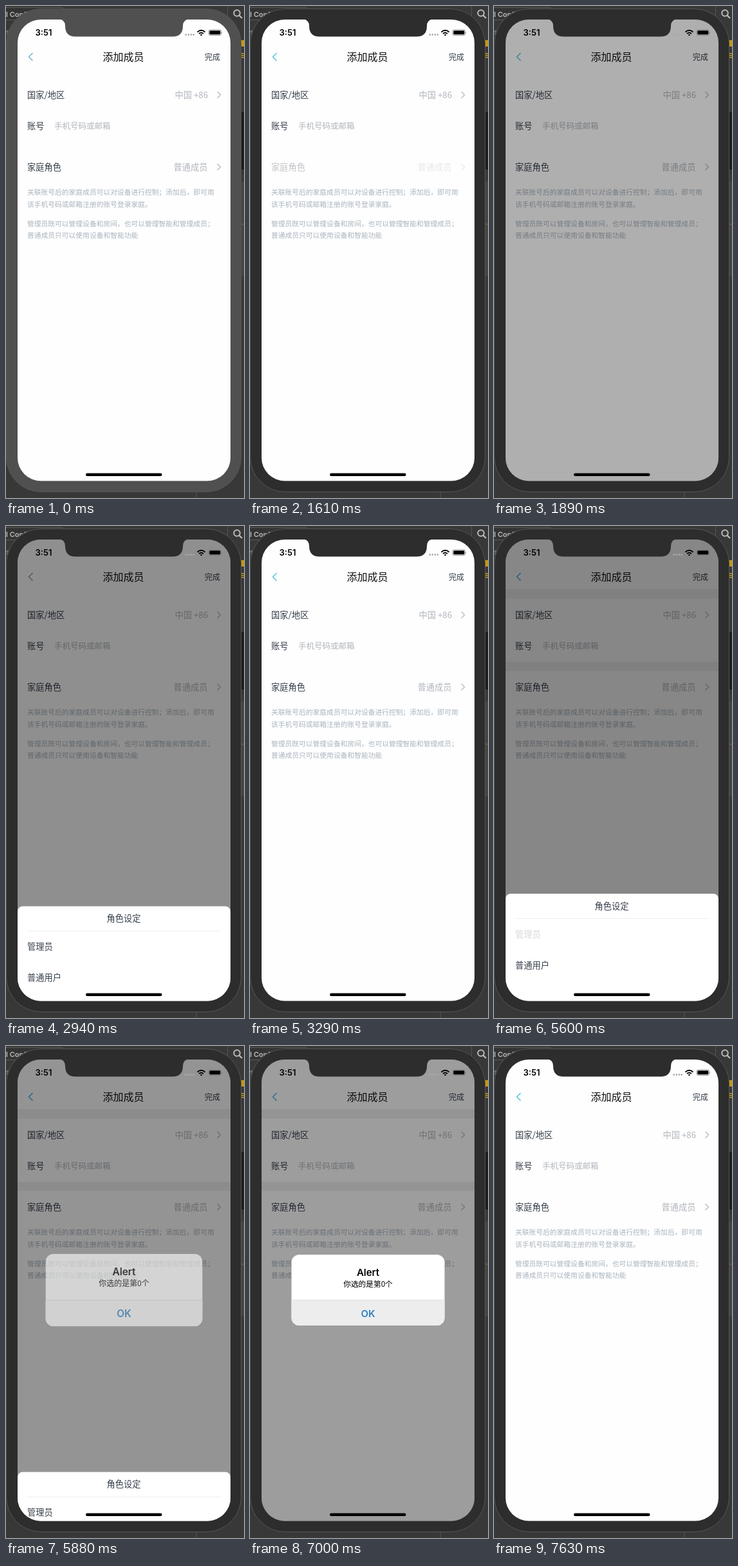
Write an HTML page that moves like this. It is 370 px wide and 764 px high and loops after 8.4 s.

```html
<!DOCTYPE html>
<html lang="zh-CN">
<head>
<meta charset="utf-8">
<style>
  html, body { margin: 0; width: 100%; height: 100%; overflow: hidden; background: #383838; }
  svg { display: block; }
  text { font: 13.24px "Noto Sans CJK SC", "Noto Sans CJK", sans-serif; fill: #343d49; }
  .latin { font-family: Inter, "Liberation Sans", sans-serif; font-weight: 600; }
  .mid { text-anchor: middle; }
  .end { text-anchor: end; }
  .pale, .pale text { fill: #b1b6bc; }
  .note text { font-size: 10.78px; fill: #a9b4be; }
  .line { fill: none; stroke-width: 1.4; }
</style>
</head>
<body>
<svg width="370" height="764" viewBox="0 0 370 764">
  <defs>
    <clipPath id="screen"><rect x="18" y="21" width="331" height="716.5" rx="36"/></clipPath>
    <clipPath id="card"><rect x="64.5" y="324" width="238" height="110" rx="12"/></clipPath>
  </defs>

  <!-- desktop behind the phone -->
  <rect width="370" height="764" fill="#383838"/>
  <rect x="-4" y="2.5" width="94" height="19" rx="3" fill="#343434" stroke="#5b5b5b"/>
  <text x="0" y="17" style="font-size:11px;fill:#bbb" class="latin" font-weight="400">l Config</text>
  <text x="0" y="44" style="font-size:10px;fill:#aaa">s</text>
  <path d="M344.5 0V22M296 754V764M0 48.5H6M362 316.5H370" stroke="#555" fill="none"/>
  <circle cx="359" cy="11" r="4.8" fill="none" stroke="#bbb" stroke-width="2"/>
  <path d="M362.5 14.5L367 19" stroke="#bbb" stroke-width="2.2"/>
  <path d="M363 53H370V63H363ZM364 73H370V74.5H364ZM364 76H370V77.5H364ZM364 79H370V80.5H364ZM364 338H370V339.5H364Z" fill="#c19a12"/>
  <path d="M364 165H370V254H364Z" fill="#1d1d1d"/>
  <path d="M364 272H370V420H364Z" fill="#4a4a4a" opacity=".7"/>

  <rect id="bezel" x=".5" y="4.5" width="365" height="750" rx="54" stroke="#555"/>

  <g clip-path="url(#screen)">
    <rect x="18" y="21" width="331" height="717" fill="#fefefe"/>
    <g id="gaps" fill="#000" opacity=".055">
      <path d="M18 98H349V113H18ZM18 211H349V225H18Z"/>
    </g>
    <path id="back" class="line" d="M41.5 73L35.5 79L41.5 85"/>
    <text x="182.5" y="85" class="mid" style="font-size:16px;fill:#111">添加成员</text>
    <text x="333" y="83.500" class="end" style="font-size:12.2px">完成</text>

    <text x="33" y="143">国家/地区</text>
    <text x="314" y="143" class="end pale">中国 +86</text>
    <path class="line" d="M328.500 133L333.500 138L328.500 143" stroke="#b9bec4"/>
    <text x="33" y="191">账号</text>
    <text x="75" y="190.500" class="pale" style="font-size:12.500px">手机号码或邮箱</text>
    <g id="role">
      <text x="33" y="255">家庭角色</text>
      <text x="313.500" y="255" class="end pale">普通成员</text>
      <path class="line" d="M328.500 245L333.500 250L328.500 255" stroke="#b9bec4"/>
    </g>
    <g class="note">
      <text x="33" y="293">关联账号后的家庭成员可以对设备进行控制；添加后，即可用</text>
      <text x="33" y="311.500">该手机号码或邮箱注册的账号登录家庭。</text>
      <text x="33" y="341.500">管理员既可以管理设备和房间，也可以管理智能和管理成员；</text>
      <text x="33" y="360">普通成员只可以使用设备和智能功能</text>
    </g>

    <rect id="dim" x="18" y="21" width="331" height="717"/>

    <g id="sheet">
      <rect x="18" y="571" width="331" height="190" rx="8" fill="#fff"/>
      <text x="183" y="595" class="mid">角色设定</text>
      <path d="M33 609.500H334" stroke="#eee"/>
      <text id="admin" x="33" y="639">管理员</text>
      <text x="33" y="687">普通用户</text>
    </g>

    <g id="alert">
      <g clip-path="url(#card)">
        <rect x="64" y="324" width="239" height="110" fill="#fff"/>
        <rect id="button" x="64" y="394" width="239" height="40"/>
        <path d="M64 394.500H303" stroke="#e2e2e2"/>
      </g>
      <text x="183.500" y="356.500" class="latin mid" style="font-size:15px;fill:#000">Alert</text>
      <text x="183.500" y="373.500" class="mid" style="font-size:11.700px;fill:#000">你选的是第0个</text>
      <text x="183.500" y="420.500" class="latin mid" style="font-size:15px;fill:#2e80c0">OK</text>
    </g>

    <!-- status bar and home indicator -->
    <text x="45.500" y="46" class="latin" style="font-size:13px;fill:#000">3:51</text>
    <path d="M278.500 44.500H293" stroke="#aaa" stroke-width="2.400" stroke-dasharray="2.400 1.600"/>
    <g fill="none" stroke="#000" stroke-width="1.800">
      <path d="M297.500 40.500Q303.500 35 309.500 40.500M300 43Q303.500 40 307 43"/>
      <path d="M302.300 45H304.700"/>
    </g>
    <rect x="315" y="37" width="19.500" height="8.600" rx="2.500" fill="none" stroke="#777" stroke-width=".8"/>
    <rect x="316.300" y="38.300" width="17" height="6" rx="1.400"/>
    <path d="M335.500 39.800Q337 41.300 335.500 42.800" fill="#777"/>
    <rect x="124" y="725.500" width="118.500" height="4.500" rx="2.250"/>
  </g>
  <path id="notch" d="M82 19V20.500Q92 21 92 31Q92 47.500 108 47.500H259Q275 47.500 275 31Q275 21 285 20.500V19Z"/>
</svg>

<script>
const LOOP = 8400, STEP = 70, DIM = .47, ALERT_DIM = .385, DROP = 167;
const el = id => document.getElementById(id);
const set = (id, name, value) => el(id).setAttribute(name, value);
const clamp = v => Math.max(0, Math.min(1, v));
const span = (t, from, to) => clamp((t - from) / (to - from));
const within = (t, from, to) => t >= from && t < to;

// Row press, backdrop fade, then the sheet rising; done at `end`.
function opening(t, end) {
  return {
    role: .3 + .7 * span(t, end - 350, end - 140),
    dim: DIM * (1 - (1 - span(t, end - 280, end)) ** 1.6),
    drop: DROP * (1 - span(t, end - 140, end)) ** 1.7
  };
}

function pose(t) {
  const s = { role: 1, dim: 0, drop: DROP, alert: 0, scale: 1 };
  if (within(t, 1610, 2940)) return { ...s, ...opening(t, 2030) };
  if (within(t, 2940, 3360)) {
    const p = span(t, 2870, 3290);
    return { ...s, dim: DIM * (1 - p ** 1.5), drop: DROP * p ** 1.2 };
  }
  if (within(t, 4130, 5740)) return { ...s, ...opening(t, 4480) };
  if (within(t, 5740, 7000)) {
    const p = span(t, 5670, 6020);
    return { ...s, dim: DIM + (ALERT_DIM - DIM) * p, drop: DROP * p ** 1.2,
             alert: p, scale: 1 + .15 * (1 - p) ** 2 };
  }
  if (within(t, 7000, 7350)) {
    const left = 1 - span(t, 7000, 7350);
    return { ...s, dim: ALERT_DIM * left, alert: left };
  }
  return s;
}

function draw(now) {
  const t = Math.floor(now % LOOP / STEP) * STEP;
  const s = pose(t), shell = t < 1610 ? "#505050" : "#2d2d2d";
  set("bezel", "fill", shell);
  set("notch", "fill", shell);
  set("back", "stroke", t < 560 ? "#74b2c2" : within(t, 2030, 3290) ? "#8b9ba2"
    : within(t, 4200, 7350) ? "#45aee0" : "#4fc3d6");
  set("gaps", "opacity", within(t, 4200, 7350) ? .055 : 0);
  set("role", "opacity", s.role);
  set("dim", "opacity", s.dim);
  set("sheet", "transform", `translate(0 ${s.drop})`);
  set("admin", "opacity", within(t, 5600, 5810) ? .2 : 1);
  set("alert", "opacity", s.alert);
  set("alert", "transform", `translate(183.5 379) scale(${s.scale}) translate(-183.5 -379)`);
  set("button", "fill", t >= 7000 ? "#ededed" : "#fbfbfb");
}

const start = performance.now();
function tick() {
  draw(performance.now() - start);
  requestAnimationFrame(tick);
}
tick();
</script>
</body>
</html>
```
